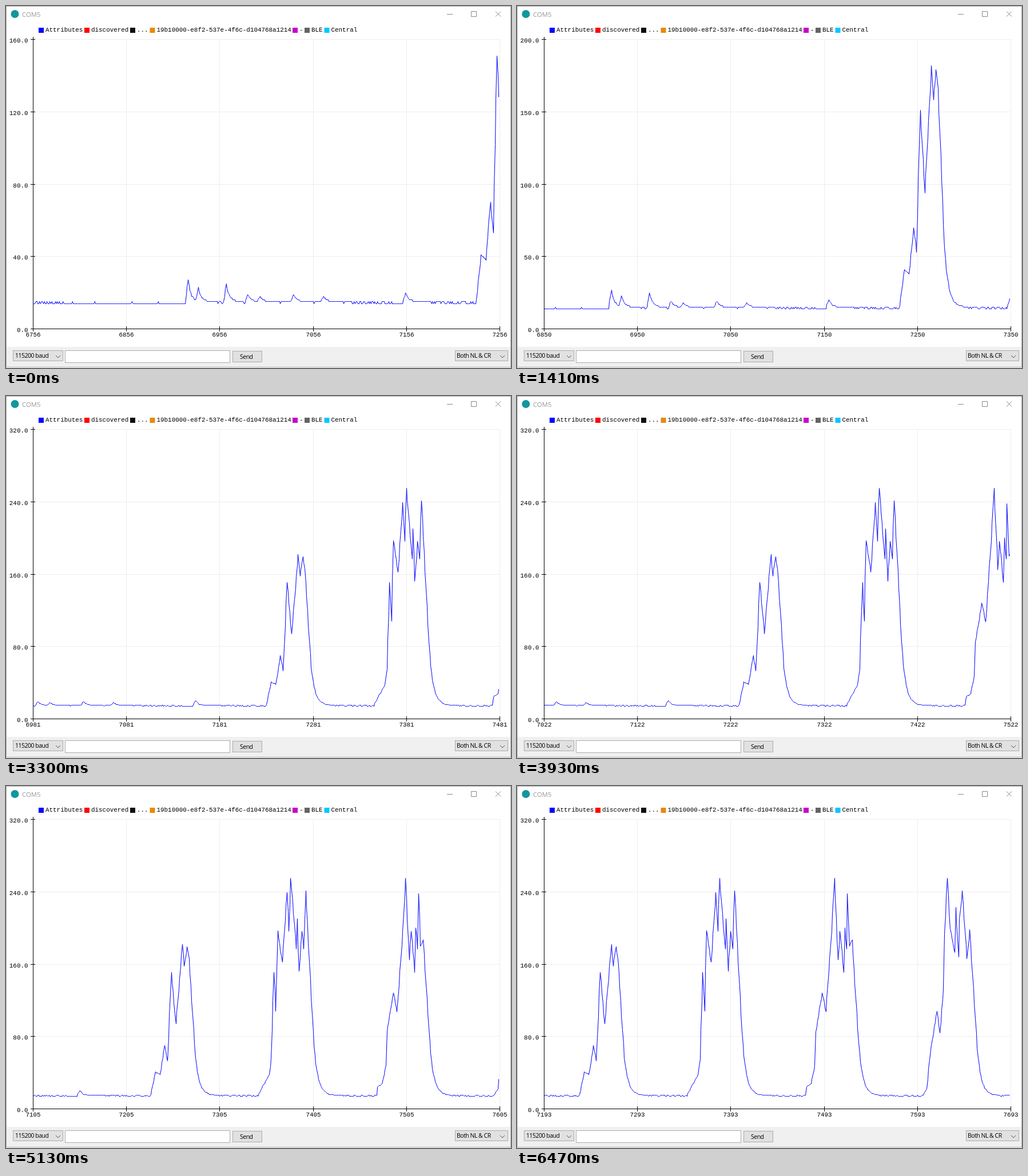
An HTML page that plays this animation: 883x634 px, repeating every 6.58 s.

```html
<!DOCTYPE html>
<html lang="en">
<head>
<meta charset="utf-8">
<title>Serial plotter</title>
<style>
  html, body { margin: 0; width: 100%; height: 100%; overflow: hidden; background: #fff; }
  svg { display: block; width: 883px; height: 634px; }
  path, rect { fill: none; }
  .mono { font: 10.9px "Liberation Mono", monospace; }
  .ui { font: 10.5px "Open Sans", sans-serif; letter-spacing: -.5px; }
  .control rect { fill: #e1e1e1; stroke: #adadad; }
  .control .field { fill: #fff; stroke: #abadb3; }
</style>
</head>
<body>
<svg viewBox="0 0 883 634">
  <rect x=".5" y=".5" width="882" height="632" stroke="#aaa"/>
  <rect x="1" y="597" width="881" height="35" style="fill:#f0f0f0"/>
  <circle cx="15.5" cy="14" r="7" fill="#12979c"/>
  <text x="28" y="18.5" fill="#999" style="font:11.3px 'Open Sans',sans-serif">COM5</text>
  <path d="M771 14.5h10M813.5 9.5h9v9h-9zM856 9.5l9 9m0-9l-9 9" stroke="#888"/>
  <g id="legend" class="mono"></g>
  <path id="grid" stroke="#eee"/>
  <path id="axes" stroke="#000"/>
  <path id="trace" stroke="#00f" stroke-linejoin="bevel"/>
  <g id="labels" class="mono"></g>
  <g class="control ui">
    <rect x="12.5" y="603.5" width="87" height="18"/>
    <rect class="field" x="103.5" y="603.5" width="288" height="21"/>
    <rect x="396.5" y="604.5" width="51" height="19"/>
    <rect x="785.5" y="603.5" width="92" height="18"/>
    <path d="M87 612l4 4l4-4M864 612l4 4l4-4" stroke="#555"/>
    <text x="16" y="616">115200 baud</text>
    <text x="409" y="617.5">Send</text>
    <text x="788" y="616">Both NL &amp; CR</text>
  </g>
</svg>
<script>
const LOOP = 6580, REFRESH = 100.8, LAST_STEP = 64;
const SPAN = 500, FIRST = 6756, LAST = 7693;
const LEFT = 47, WIDTH = 816, TOP = 58, BOTTOM = 565;
const $ = id => document.getElementById(id);

function add(parent, tag, attributes, content = '') {
  const node = document.createElementNS('http://www.w3.org/2000/svg', tag);
  for (const [name, value] of Object.entries(attributes)) node.setAttribute(name, value);
  node.textContent = content;
  return parent.appendChild(node);
}

function interpolate(points, x) {
  const n = Math.max(1, points.findIndex(p => p[0] >= x));
  const [x0, y0] = points[n - 1], [x1, y1] = points[n];
  return y0 + (y1 - y0) * (x - x0) / (x1 - x0);
}

// Turning points of the large bursts: [samples after start, reading]
const bursts = [
  { start: 7231, points: [[0, 16], [5, 41], [10, 38], [15, 70], [18, 53], [22, 151], [27, 94],
    [34, 182], [36, 158], [39, 179], [41, 166], [48, 56]] },
  { start: 7347, points: [[0, 17], [11, 38], [13, 55], [16, 151], [18, 108], [20, 197], [25, 162],
    [30, 239], [32, 196], [34, 255], [40, 177], [41, 210], [43, 152], [46, 196], [48, 177], [50, 241], [58, 85]] },
  { start: 7473, points: [[0, 15], [1, 24], [6, 28], [10, 48], [11, 85], [18, 128], [22, 107], [28, 196],
    [31, 255], [35, 165], [37, 196], [41, 151], [42, 200], [44, 177], [45, 238], [47, 180], [50, 187], [57, 73]] },
  { start: 7599, points: [[0, 15], [4, 22], [8, 65], [15, 108], [18, 84], [22, 133], [23, 193], [26, 255],
    [29, 199], [34, 173], [35, 223], [38, 168], [39, 210], [42, 241], [47, 166], [50, 198], [58, 67]] },
];
// Small bumps: [sample, peak]
const bumps = [[6922, 27], [6933, 23], [6963, 25], [6986, 19], [6999, 18], [7035, 19], [7067, 18], [7155, 20]];

const random = n => { const s = Math.sin(n * 12.9898) * 43758.5453; return s - Math.floor(s); };
const decay = (peak, age, rate) => 15 + (peak - 15) * Math.exp(-age / rate);

// Rest flickers between 14 and 15, settling to 14 after activity; each peak fades exponentially.
function reading(i) {
  let lastActive = FIRST - 30, value = 14;
  for (const [peakAt, peak] of bumps) {
    const age = i - peakAt;
    if (age >= 0) {
      value = Math.max(value, decay(peak, age, 3.2));
      lastActive = peakAt;
    } else if (age > -3) value = peak + (peak - 15) * age / 3;
  }
  for (const { start, points } of bursts) {
    const [length, end] = points.at(-1), age = i - start;
    if (age >= 0 && age <= length) return Math.round(interpolate(points, age));
    if (age > length) {
      value = decay(end, age - length, 4.4);
      lastActive = start + length;
    }
  }
  const resting = random(i) < 1.6 * Math.exp((lastActive - i) / 35) ? 15 : 14;
  return value < 15.5 ? resting : Math.round(value);
}
const readings = Array.from({ length: LAST + SPAN - FIRST }, (_, i) => reading(FIRST + i));

// [refresh step, first visible sample]
const scroll = [[0, 6756], [14, 6850], [26, 6933], [33, 6981], [45, 7062], [56, 7140], [64, 7193]];

[['#00f', 57, 'Attributes'], ['#f00', 137, 'discovered'], ['#0a0f0f', 217, '...'],
  ['#e8890c', 251.5, '19b10000-e8f2-537e-4f6c-d104768a1214'], ['#c800c8', 501, '-'],
  ['#646464', 522, 'BLE'], ['#00c8ff', 556.5, 'Central']].forEach(([color, x, name]) => {
  add($('legend'), 'rect', { x, y: 38, width: 9, height: 9, style: `fill:${color}` });
  add($('legend'), 'text', { x: x + 12, y: 45 }, name);
});

const columns = [0, 1, 2, 3, 4, 5].map(n => Math.round(LEFT + WIDTH * n / 5) + .5);
const rows = [0, 1, 2, 3, 4].map(n => Math.round(BOTTOM - (BOTTOM - TOP) * n / 4) + .5);
const lines = (list, line) => list.slice(1).map(line).join('');
$('grid').setAttribute('d',
  lines(columns, x => `M${x} ${TOP}V${BOTTOM}`) + lines(rows, y => `M${LEFT} ${y}H864`));
$('axes').setAttribute('d', `M${columns[0]} 54V570M43 ${rows[0]}H864` +
  lines(columns, x => `M${x} 561V570`) + lines(rows, y => `M43 ${y}H51`));
const xLabels = columns.map(x => add($('labels'), 'text', { x, y: 579, 'text-anchor': 'middle' }));
const yLabels = rows.map(y => add($('labels'), 'text', { x: 38.5, y: y + 5, 'text-anchor': 'end' }));

let shown = -1;
function draw(now) {
  requestAnimationFrame(draw);
  const step = Math.min(LAST_STEP, Math.floor((now % LOOP + 27) / REFRESH));
  if (step === shown) return;
  shown = step;
  const start = Math.round(interpolate(scroll, step));
  const visible = readings.slice(start - FIRST, start - FIRST + SPAN);
  const peak = Math.max(...visible);
  const top = [160, 200, 320].find(limit => limit >= peak);
  $('trace').setAttribute('d', 'M' + visible.map((v, i) =>
    `${Math.round(LEFT + i * WIDTH / SPAN) + .5} ${Math.round(BOTTOM - v * (BOTTOM - TOP) / top) + .5}`).join('L'));
  xLabels.forEach((label, n) => label.textContent = start + n * 100);
  yLabels.forEach((label, n) => label.textContent = (top * n / 4).toFixed(1));
}
draw(0);
</script>
</body>
</html>
```
